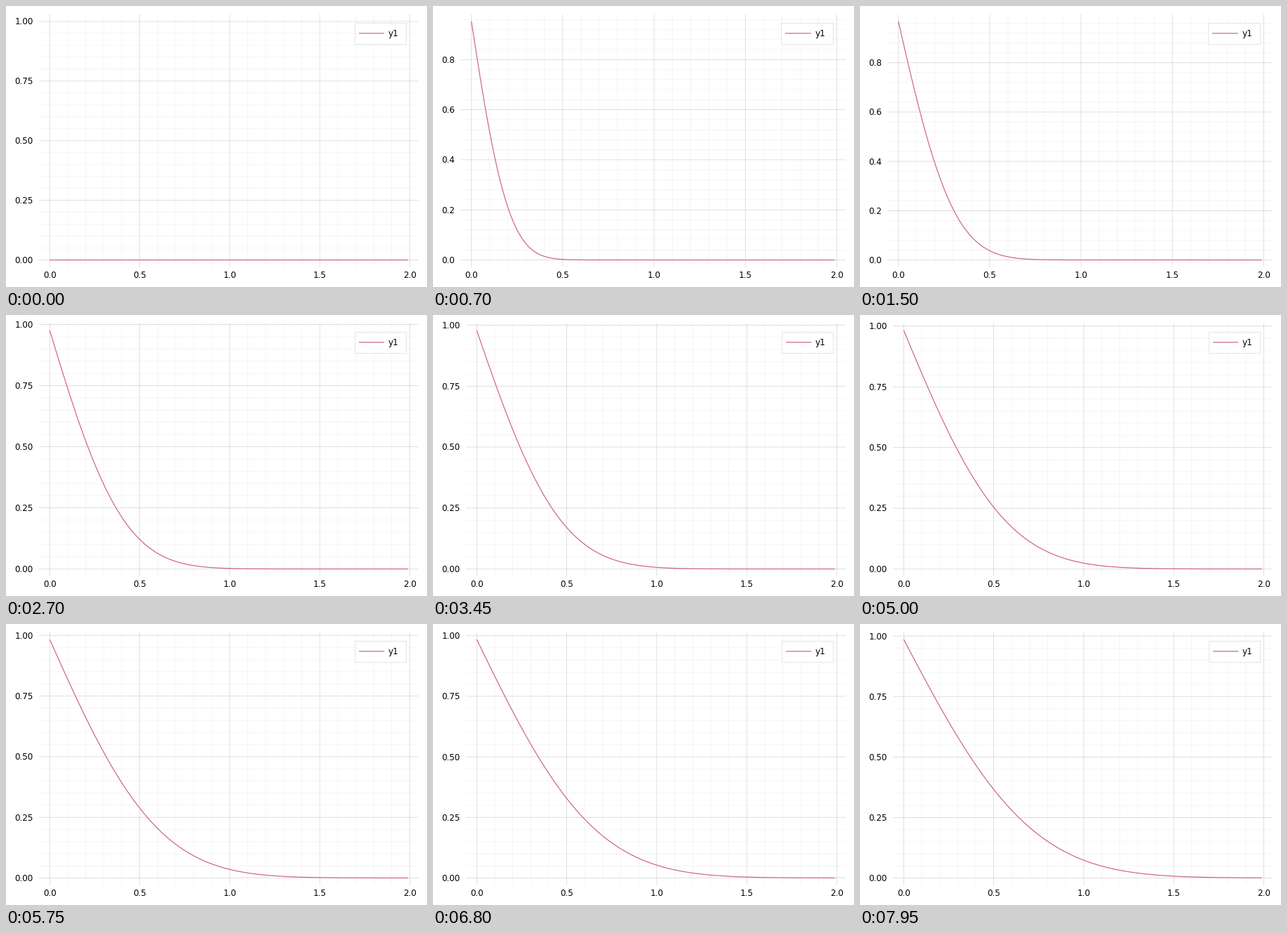
These frames come from a looping animation (600 px wide and 400 px high, 8000 ms). A matplotlib script:

```python
import math

import numpy as np
import matplotlib.pyplot as plt
from matplotlib.animation import FuncAnimation
from matplotlib.collections import LineCollection
from matplotlib.patches import Rectangle

W, H, DPI = 600, 400, 100
FRAMES, INTERVAL = 160, 50
PX = 72 / DPI                      # one pixel in points

TOP, RIGHT, BOTTOM = 11.8, 588.2, 371.7
PAD = 0.03                         # axis margin as a share of the data range
DX, X_MAX = 0.01, 1.99
DIFF = 0.001                       # diffusivity times time per frame
FONT = 12 * PX
HALF_DIGIT = 4.4
ROSE = "#CC6677"

xs = np.arange(200) * DX

fig = plt.figure(figsize=(W / DPI, H / DPI), dpi=DPI, facecolor="white")
ax = fig.add_axes([0, 0, 1, 1])
ax.set_xlim(0, W)
ax.set_ylim(H, 0)
ax.axis("off")


def label(ha):
    return ax.text(0, 0, "", ha=ha, va="baseline", fontsize=FONT,
                   family="DejaVu Sans", color="black", zorder=6)


def grid(alpha):
    lines = LineCollection([], colors=[(0, 0, 0, alpha)],
                           linewidths=0.8 * PX, zorder=1)
    lines.set_snap(False)
    return ax.add_collection(lines, autolim=False)


def stroke(z):
    line, = ax.plot([], [], color=ROSE, lw=1.2 * PX, zorder=z,
                    solid_capstyle="butt", solid_joinstyle="round")
    line.set_snap(False)
    return line


minor, major = grid(0.05), grid(0.1)
curve, key = stroke(3), stroke(5)
box = ax.add_patch(Rectangle((0, 0), 1, 1, fc="white", ec="#E5E5E5",
                             lw=1 * PX, zorder=4))
x_labels = [label("center") for _ in range(5)]
y_labels = [label("right") for _ in range(5)]
name = label("left")
name.set_text("y1")


def heat(n):
    """Temperature of a rod heated to 1 just left of its first cell."""
    if n == 0:
        return np.zeros_like(xs)
    width = 2 * math.sqrt(DIFF * n)
    return np.array([math.erfc((x + DX) / width) for x in xs])


def steps(step, top):
    return [i * step for i in range(int(top / step + 1e-9) + 1)]


def draw(n):
    u = heat(n)
    peak = u[0] if n else 1.0
    y_top = peak * (1 + PAD)
    y_step, digits, left = (0.25, 2, 47.0) if y_top >= 1 else (0.2, 1, 39.2)

    width = RIGHT - left
    x_scale = width / (X_MAX * (1 + 2 * PAD))
    y_scale = (BOTTOM - TOP) / (peak * (1 + 2 * PAD))

    def px(x):
        return left + (x + PAD * X_MAX) * x_scale

    def py(y):
        return BOTTOM - (y + PAD * peak) * y_scale

    def rules(x_gap, y_gap):
        down = [[(px(x), TOP), (px(x), BOTTOM)] for x in steps(x_gap, 2.04)]
        across = [[(left, py(y)), (RIGHT, py(y))] for y in steps(y_gap, y_top)]
        return down + across

    minor.set_segments(rules(0.1, y_step / 5))
    major.set_segments(rules(0.5, y_step))

    for i, text in enumerate(x_labels):
        text.set_text(f"{i * 0.5:.1f}")
        text.set_position((px(i * 0.5), 387))
    for i, text in enumerate(y_labels):
        y = i * y_step
        text.set_text(f"{y:.{digits}f}")
        text.set_position((left - 8.2, py(y) + HALF_DIGIT))

    curve.set_data(px(xs), py(u))

    # the legend scales with the plot area
    box_w, box_h = 0.1079 * width + 14.7, 30.2
    x0, y0 = RIGHT - width / 30 - box_w, TOP + (BOTTOM - TOP) / 30
    mid = y0 + box_h / 2
    box.set_bounds(x0, y0, box_w, box_h)
    start = x0 + width / 90
    end = start + width / 15
    key.set_data([start, end], [mid, mid])
    name.set_position((end + 5.6, mid + HALF_DIGIT))
    return [minor, major, curve, box, key, name, *x_labels, *y_labels]


anim = FuncAnimation(fig, draw, frames=FRAMES, interval=INTERVAL,
                     init_func=lambda: draw(0), repeat=True, repeat_delay=0)
plt.show()
```
